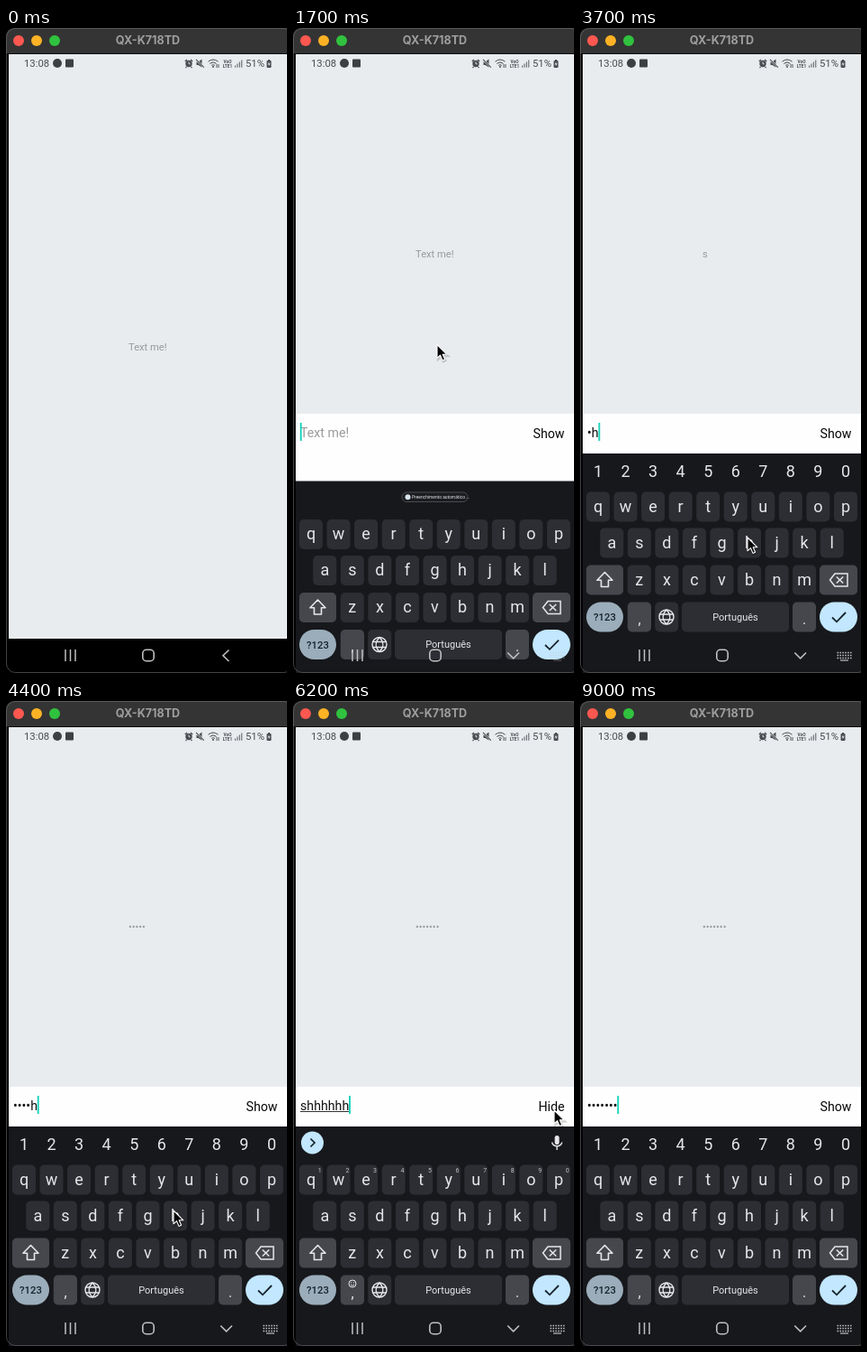
Animation, 312 px wide and 714 px high, one loop 9.3 s. Source, as an HTML page:

```html
<!DOCTYPE html>
<html lang="pt">
<head>
<meta charset="utf-8">
<title>Password field</title>
<style>
html, body { margin: 0; width: 100%; height: 100%; overflow: hidden; background: #000; }
svg { display: block; width: 312px; height: 714px; font-family: Roboto, sans-serif; }
text { white-space: pre; }
</style>
</head>
<body>
<svg id="stage" viewBox="0 0 312 714" xmlns="http://www.w3.org/2000/svg"></svg>
<script>
const LOOP = 9300;
const PAPER = '#e9ecef';
const stage = document.getElementById('stage');

function add(parent, tag, attrs, content) {
  const el = document.createElementNS('http://www.w3.org/2000/svg', tag);
  for (const k in attrs) el.setAttribute(k, attrs[k]);
  if (content !== undefined) el.textContent = content;
  parent.appendChild(el);
  return el;
}
const group = (p, a) => add(p, 'g', a || {});
const rect = (p, x, y, width, height, fill, rx = 0) => add(p, 'rect', { x, y, width, height, fill, rx });
const circle = (p, cx, cy, r, fill) => add(p, 'circle', { cx, cy, r, fill });
const ring = (p, cx, cy, r, stroke, w = 1) =>
  add(p, 'circle', { cx, cy, r, fill: 'none', stroke, 'stroke-width': w });
const line = (p, d, stroke, w = 1.5, extra = {}) =>
  add(p, 'path', { d, fill: 'none', stroke, 'stroke-width': w, ...extra });
const shape = (p, d, fill) => add(p, 'path', { d, fill });
const label = (p, x, y, size, fill, str, anchor = 'middle', extra = {}) =>
  add(p, 'text', { x, y, 'font-size': size, fill, 'text-anchor': anchor, ...extra }, str);
const show = (el, on) => el.setAttribute('display', on ? 'inline' : 'none');

// Window and app background
rect(stage, 3, 28, 309, 648, PAPER);
shape(stage, 'M0 28V10Q0 0 10 0H312V28Z', '#343434');
rect(stage, 0, 28, 312, 1, '#0c0c0c');
['#fe5850', '#fdb225', '#30c23e'].forEach((c, i) => circle(stage, 14 + 20 * i, 14, 6, c));
label(stage, 157.5, 18, 12.6, '#9e9e9e', 'QX-K718TD', 'middle',
  { 'font-family': 'Inter, sans-serif', 'font-weight': 700 });

drawStatus(group(stage));
const preview = label(stage, 136, 357, 11.2, '#969a9d', '', 'start');

// Input row
const bar = group(stage);
rect(bar, 3, 427, 309, 287, '#fefefe');
const field = label(bar, 8, 452.5, 14.2, '#111', '', 'start');
const underline = rect(bar, 8, 454, 55, 1, '#333');
const toggle = label(bar, 301.5, 453.7, 14.2, '#080808', '', 'end');
const caret = rect(bar, 0, 437, 1.9, 20, '#18d2b8');

// Navigation and keyboard
rect(stage, 0, 676, 312, 38, '#000');
const keyboard = group(stage);
const ui = drawKeyboard(keyboard);
const nav = drawNav(group(stage));

add(stage, 'rect', { x: 0.5, y: 0.5, width: 318, height: 713, rx: 10, fill: 'none',
  stroke: '#77797b', 'stroke-opacity': 0.55 });
rect(stage, 1, 29, 2, 660, '#000');

const pointer = group(stage);
line(pointer, 'M1 2.5V16.5L4.4 13.6 6.9 18.8 9.3 17.7 7 12.5H12Z', '#000', 2.4, { opacity: 0.16 });
add(pointer, 'path', { d: 'M0 0V14.8L3.5 11.7 6 17.4 8.6 16.2 6.2 10.8H10.9Z', fill: '#050505',
  stroke: '#fff', 'stroke-width': 1.1, 'stroke-linejoin': 'round' });

function drawStatus(g) {
  const ink = '#484c50';
  label(g, 20, 43, 11.3, ink, '13:08', 'start');
  circle(g, 57, 39, 5, '#3d4043');
  rect(g, 66, 34.5, 9, 9, '#3d4043', 1);
  // alarm
  circle(g, 203, 39.5, 3.7, ink);
  line(g, 'M198.8 37L201 35M207.2 37L205 35M200.5 43L199.5 44M205.5 43L206.5 44', ink, 1.3);
  line(g, 'M203 37.4V39.8H204.6', PAPER, 0.9);
  // muted speaker
  shape(g, 'M211.5 37.5H213.5L217.5 34.5V43.5L213.5 41H211.5Z', ink);
  line(g, 'M211 35L220 43.5', PAPER, 2);
  line(g, 'M211 34.8L219.8 43.6', ink, 1.1);
  // wifi
  line(g, 'M224.5 37.2Q230 32.8 235.5 37.2M226.3 39.4Q230 36.4 233.6 39.4M228.2 41.4Q230 40 231.8 41.4', ink, 1);
  circle(g, 230, 43, 1, ink);
  line(g, 'M234 44V40M236 40V44', ink, 0.9);
  const bold = { 'font-weight': 700 };
  label(g, 246, 38.6, 4.8, ink, 'VoO', 'middle', bold);
  label(g, 246, 43.8, 4.8, ink, 'LTE1', 'middle', bold);
  for (let i = 0; i < 4; i++) rect(g, 254 + 2.4 * i, 41.5 - 2 * i, 1.1, 2.2 + 2 * i, '#65696d');
  label(g, 266, 43, 11.3, ink, '51%', 'start');
  rect(g, 289.5, 36, 5, 8, ink, 1);
  rect(g, 291, 35, 2, 1.5, ink);
  shape(g, 'M292.4 37L290.6 40.4H292L291.6 42.8 293.5 39.3H292Z', PAPER);
}

function drawKeyboard(g) {
  const ink = '#e6e6eb', dark = '#2d2e33', mid = '#46474c', blue = '#c2e7ff', navy = '#16222c';
  const pitch = 30.55;
  rect(g, 3, 471, 309, 243, '#17181c');
  const key = (x, y, w, fill, r = 5) => rect(g, x, y - 16.5, w, 33, fill, r);
  ['qwertyuiop', 'asdfghjkl', 'zxcvbnm'].forEach((row, r) => {
    const x0 = [20, 35.3, 65.8][r], y = [530, 570, 611][r];
    [...row].forEach((ch, i) => {
      const x = x0 + pitch * i;
      key(x - 13, y, 26, dark);
      label(g, x, y + 5.5, 18, ink, ch);
    });
  });
  // shift and backspace
  key(7, 611, 41, mid);
  key(266, 611, 42, mid);
  line(g, 'M27.5 602.5L19 611.3H23.5V618.5H31.5V611.3H36Z', ink, 1.6, { 'stroke-linejoin': 'round' });
  line(g, 'M283 604H297V618H283L277.5 611ZM284.8 607.5L292.2 614.5M292.2 607.5L284.8 614.5', ink, 1.5);
  // bottom row
  key(7, 652, 41, '#9badba', 16.5);
  label(g, 27.5, 656, 11.3, navy, '?123', 'middle', { 'font-weight': 500 });
  key(52.8, 652, 26.2, mid);
  key(83.2, 652, 26, dark);
  ring(g, 96, 652, 8, ink, 1.4);
  line(g, 'M88.5 649H103.5M88.5 655H103.5M96 644C91 649 91 655 96 660M96 644C101 649 101 655 96 660', ink, 1.4);
  key(113, 652, 119, dark);
  key(236, 652, 26, mid);
  label(g, 249, 659.5, 16, ink, '.');
  key(266, 652, 42, blue, 16.5);
  line(g, 'M280 652.5L285 657.3 295 647', navy, 1.8);

  const space = label(g, 172.5, 655.8, 11, ink, '');
  const comma = label(g, 66, 659.5, 16, ink, ',');

  const chip = group(g);
  add(chip, 'rect', { x: 121, y: 483.5, width: 73, height: 10.5, rx: 5.2, fill: '#1b1c20', stroke: '#55575c', 'stroke-width': 0.8 });
  circle(chip, 127.5, 488.7, 3, '#d5e4ea');
  label(chip, 132, 490.5, 4.9, ink, 'Preenchimento automático ...', 'start');

  const digits = group(g);
  [...'1234567890'].forEach((d, i) => label(digits, 20 + pitch * i, 496.5, 18, ink, d));

  const hints = group(g);
  [...'1234567890'].forEach((d, i) => label(hints, 29.8 + pitch * i, 522, 7, '#c2c3c8', d));
  ring(hints, 66, 645, 4, ink);
  line(hints, 'M64 646.2Q66 648.4 68 646.2', ink, 0.9);
  circle(hints, 64.6, 643.8, 0.6, ink);
  circle(hints, 67.4, 643.8, 0.6, ink);

  const strip = group(g);
  circle(strip, 21.5, 489, 12.5, blue);
  line(strip, 'M19.5 484.5L24 489 19.5 493.5', navy, 1.7);
  const words = group(strip);
  label(words, 76, 494.7, 15, ink, 'shhhhhh');
  label(words, 157, 494.7, 15, ink, 'shhhh');
  label(words, 237, 494.7, 15, ink, 'shhhh HH');
  line(words, 'M114.5 480V499M200.5 480V499', '#3c3e43', 1);
  rect(strip, 290.6, 481, 5, 10, ink, 2.5);
  line(strip, 'M287.5 488.5A5.8 5.8 0 0 0 298.7 488.5M293.1 493.5V497', ink, 1.4);

  return { space, comma, chip, digits, hints, strip, words };
}

function drawNav(g) {
  const ink = '#bfc0c2';
  line(g, 'M66 688V701M71.5 688V701M77 688V701', ink, 1.5);
  add(g, 'rect', { x: 151.8, y: 688.3, width: 12.4, height: 12.4, rx: 4, fill: 'none', stroke: ink, 'stroke-width': 1.6 });
  const back = line(g, 'M247.5 688.5L241 694.7 247.5 701', ink, 1.6);
  const down = line(g, 'M238.3 691.5L244.7 697.8 251 691.5', ink, 1.6);
  const pad = group(g);
  line(pad, 'M285.5 691.5H301.5M285.5 694.5H301.5M285.5 697.5H301.5', ink, 1.5, { 'stroke-dasharray': '1.6 1.3' });
  line(pad, 'M289 700H298', ink, 1.2);
  return { back, down, pad };
}

// Pointer path: time, x, y
const path = [
  [500, 292, 716], [800, 262, 610], [1150, 182, 400], [1400, 160, 350.5], [1950, 160, 350.5],
  [2550, 65, 566], [2950, 65, 566], [3400, 186, 564], [4900, 186, 564],
  [5100, 218, 568], [5350, 256, 520], [5700, 290, 453], [7650, 290, 453], [8200, 318, 19]
];
const strokes = [2800, 3650, 4000, 4150, 4300, 4450, 4600];
const blinks = [1600, ...strokes, 6000, 7700, 8700, 9200];
const FOCUS = 1550, REVEAL = 6000, HIDE = 7700;

function pointerAt(t) {
  const i = path.findIndex(p => p[0] > t);
  if (i < 1) return null;
  const [a, b] = [path[i - 1], path[i]];
  const u = (t - a[0]) / (b[0] - a[0]);
  const e = u * u * (3 - 2 * u);
  return [a[1] + (b[1] - a[1]) * e, a[2] + (b[2] - a[2]) * e];
}

function fieldText(t, count, plain) {
  const value = 'shhhhhh'.slice(0, count);
  if (!count) return 'Text me!';
  if (plain) return value;
  const fresh = t - strokes[count - 1] < 1500;
  return fresh ? '•'.repeat(count - 1) + value[count - 1] : '•'.repeat(count);
}

function render(t) {
  const open = t >= FOCUS + 30;
  const rise = Math.min(1, Math.max(0, (t - FOCUS) / 250));
  const count = strokes.filter(s => s <= t).length;
  const plain = t >= REVEAL && t < HIDE;

  show(bar, open);
  show(keyboard, open);
  keyboard.setAttribute('transform', `translate(0 ${243 * (1 - rise) ** 2.24})`);
  show(nav.back, !open);
  show(nav.down, open);
  nav.pad.setAttribute('opacity', rise ** 2);

  // The upper copy trails the field by one update
  const copied = strokes.filter(s => s + 90 <= t).length;
  preview.textContent = copied > 1 ? '•'.repeat(copied) : copied ? 's' : 'Text me!';
  preview.setAttribute('y', open ? 254 : 357);

  field.textContent = fieldText(t, count, plain);
  field.setAttribute('fill', count ? '#111' : '#9b9b9b');
  toggle.textContent = plain ? 'Hide' : 'Show';
  show(underline, plain);

  const last = blinks.filter(b => b <= t).pop();
  show(caret, open && Math.floor((t - last) / 500) % 2 === 0);
  const width = open && count ? field.getComputedTextLength() : 0;
  caret.setAttribute('x', 7.8 + width);
  underline.setAttribute('width', width);

  const text = plain && t >= REVEAL + 100;
  const bilingual = text && t >= 6900;
  show(ui.chip, !count);
  show(ui.digits, count > 0 && !text);
  show(ui.hints, text);
  show(ui.strip, text);
  show(ui.words, t >= REVEAL + 400);
  ui.comma.setAttribute('y', text ? 661 : 659.5);
  ui.space.textContent = bilingual ? 'PT • EN' : 'Português';
  ui.space.setAttribute('font-size', bilingual ? 10 : 11);

  const at = pointerAt(t);
  show(pointer, at);
  if (at) pointer.setAttribute('transform', `translate(${at[0]} ${at[1]})`);
}

const start = performance.now();
function tick() {
  render((performance.now() - start) % LOOP);
  requestAnimationFrame(tick);
}
tick();
</script>
</body>
</html>
```
